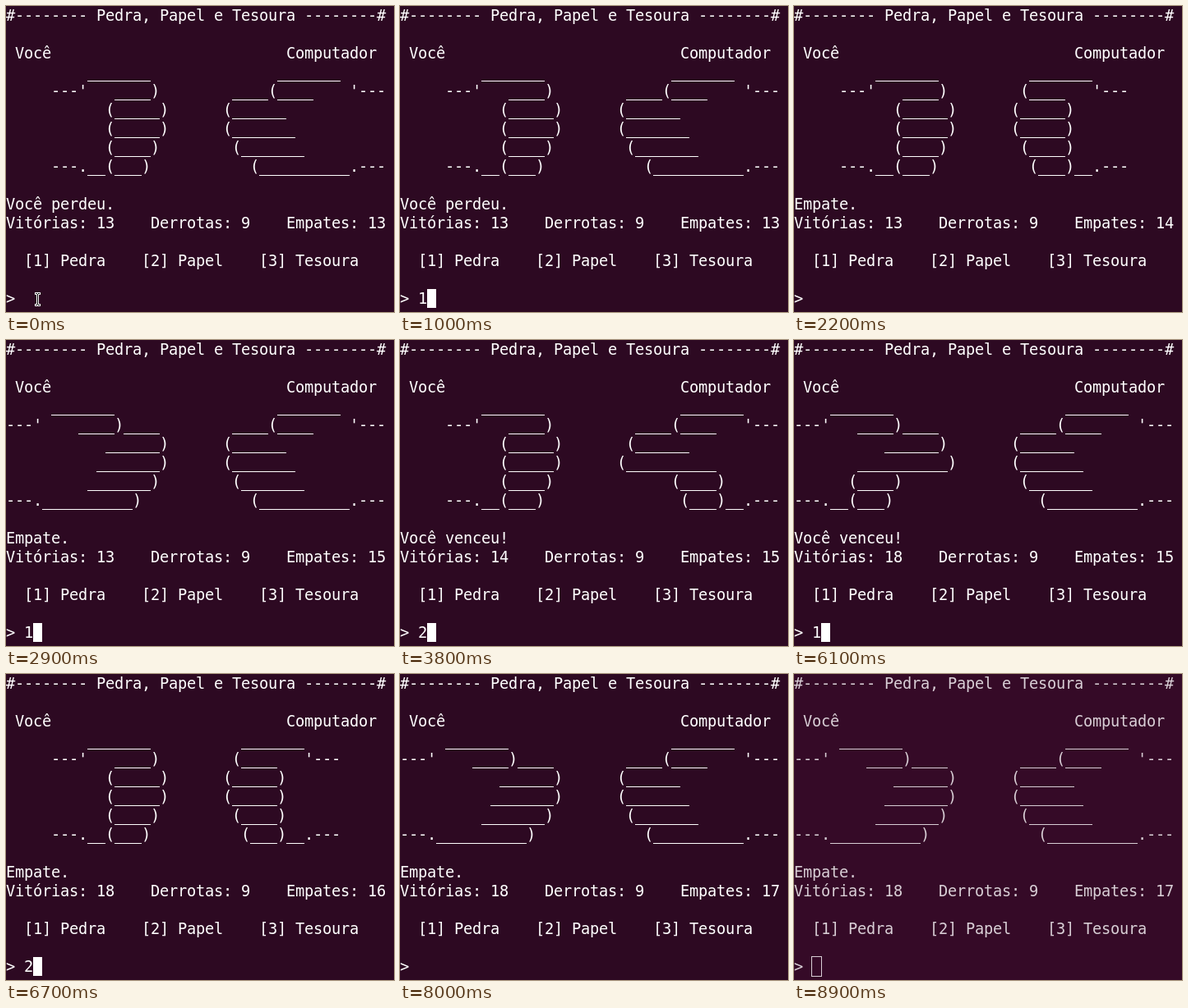
These frames come from a looping animation (472 px wide and 373 px high, 9.1 s). An HTML page with a canvas:

```html
<!DOCTYPE html>
<html lang="pt">
<head>
<meta charset="utf-8">
<title>Pedra, Papel e Tesoura</title>
<style>
html, body { margin: 0; width: 100%; height: 100%; overflow: hidden; background: #2d0922; }
canvas { display: block; }
</style>
</head>
<body>
<canvas id="stage" width="472" height="373"></canvas>
<script>
const ctx = document.getElementById('stage').getContext('2d');
const LOOP = 9100, COLS = 42, CW = 11, CH = 23, BASE = 18;

const HANDS = {
  rock: [
    "         _______",
    "     ---'   ____)",
    "           (_____)",
    "           (_____)",
    "           (____)",
    "     ---.__(___)"
  ],
  paper: [
    "     _______",
    "---'    ____)____",
    "           ______)",
    "          _______)",
    "         _______)",
    "---.__________)"
  ],
  scissors: [
    "    _______",
    "---'   ____)____",
    "          ______)",
    "       __________)",
    "      (____)",
    "---.__(___)"
  ]
};

const LOST = 'Você perdeu.', DRAW = 'Empate.', WON = 'Você venceu!';

// start, player, computer, message, wins, draws
const ROUNDS = [
  [0, 'rock', 'paper', LOST, 13, 13],
  [1500, 'rock', 'rock', DRAW, 13, 14],
  [2400, 'paper', 'paper', DRAW, 13, 15],
  [3500, 'rock', 'scissors', WON, 14, 15],
  [4000, 'paper', 'rock', WON, 15, 15],
  [4700, 'paper', 'rock', WON, 16, 15],
  [5500, 'rock', 'scissors', WON, 17, 15],
  [6000, 'scissors', 'paper', WON, 18, 15],
  [6400, 'rock', 'rock', DRAW, 18, 16],
  [7600, 'paper', 'paper', DRAW, 18, 17]
];

// start, typed text, cursor style
const PROMPT = [
  [0, '', ''], [400, '', 'block'], [900, '', ''], [1000, '1', 'block'],
  [1500, '', ''], [1700, '', 'block'], [2200, '', ''], [2900, '1', 'block'],
  [3500, '', ''], [3800, '2', 'block'],
  [4000, '', ''], [4400, '', 'block'], [4500, '2', 'block'],
  [4700, '', ''], [4900, '1', 'block'],
  [5500, '', ''], [5800, '3', 'block'],
  [6000, '', ''], [6100, '1', 'block'],
  [6400, '', ''], [6700, '2', 'block'], [7500, '2', ''],
  [7600, '', ''], [8300, '', 'block'], [8800, '', 'hollow']
];

// start, x, y of the mouse pointer; no position means hidden
const POINTER = [
  [0, 35, 349], [1000], [7900, 35, 349], [8000],
  [8400, 20, 120], [8500, 12, 3], [8600]
];

// start, background, foreground
const THEME = [
  [0, '#2d0922', '#ffffff'],
  [8800, '#310a25', '#ece7ea'],
  [8900, '#350a27', '#d8ced5']
];

const at = (list, t) => list.filter(item => item[0] <= t).pop();

const FLIP = { '(': ')', ')': '(' };
const mirror = line =>
  [...line.padEnd(COLS)].reverse().map(c => FLIP[c] || c).join('');

function print(row, text, col = 0) {
  const y = row * CH;
  [...text].forEach((c, i) => {
    const x = (col + i) * CW;
    if (c === '_') ctx.fillRect(x, y + 22, CW, 1);
    else if (c !== ' ') ctx.fillText(c, x, y + BASE);
  });
}

function drawCursor(col, style) {
  const x = col * CW, y = 15 * CH;
  if (style === 'block') ctx.fillRect(x, y, CW, CH);
  if (style === 'hollow') ctx.strokeRect(x - 0.5, y - 0.5, CW + 1, CH + 1);
}

function drawPointer(x, y) {
  ctx.fillStyle = '#ffffff';
  ctx.fillRect(x, y, 7, 3);
  ctx.fillRect(x + 2, y, 3, 17);
  ctx.fillRect(x, y + 14, 7, 3);
  ctx.fillStyle = '#000000';
  for (const dy of [1, 15]) {
    ctx.fillRect(x + 1, y + dy, 2, 1);
    ctx.fillRect(x + 4, y + dy, 2, 1);
  }
  ctx.fillRect(x + 3, y + 2, 1, 13);
}

function render(t) {
  const [, back, ink] = at(THEME, t);
  const [, mine, theirs, message, wins, draws] = at(ROUNDS, t);
  const [, typed, cursor] = at(PROMPT, t);
  const [, px, py] = at(POINTER, t);

  ctx.fillStyle = back;
  ctx.fillRect(0, 0, 472, 373);
  ctx.fillStyle = ctx.strokeStyle = ink;
  ctx.lineWidth = 1;
  ctx.font = '18.67px "DejaVu Sans Mono", monospace';

  print(0, '#-------- Pedra, Papel e Tesoura --------#');
  print(2, 'Você', 1);
  print(2, 'Computador', 31);
  HANDS[mine].forEach((line, i) => print(3 + i, line));
  HANDS[theirs].forEach((line, i) => print(3 + i, mirror(line)));
  print(10, message);
  print(11, `Vitórias: ${wins}    Derrotas: 9    Empates: ${draws}`);
  print(13, '  [1] Pedra    [2] Papel    [3] Tesoura');
  print(15, '> ' + typed);
  drawCursor(2 + typed.length, cursor);
  if (px !== undefined) drawPointer(px, py);
}

const start = performance.now();
function tick() {
  render((performance.now() - start) % LOOP);
  requestAnimationFrame(tick);
}
tick();
</script>
</body>
</html>
```
